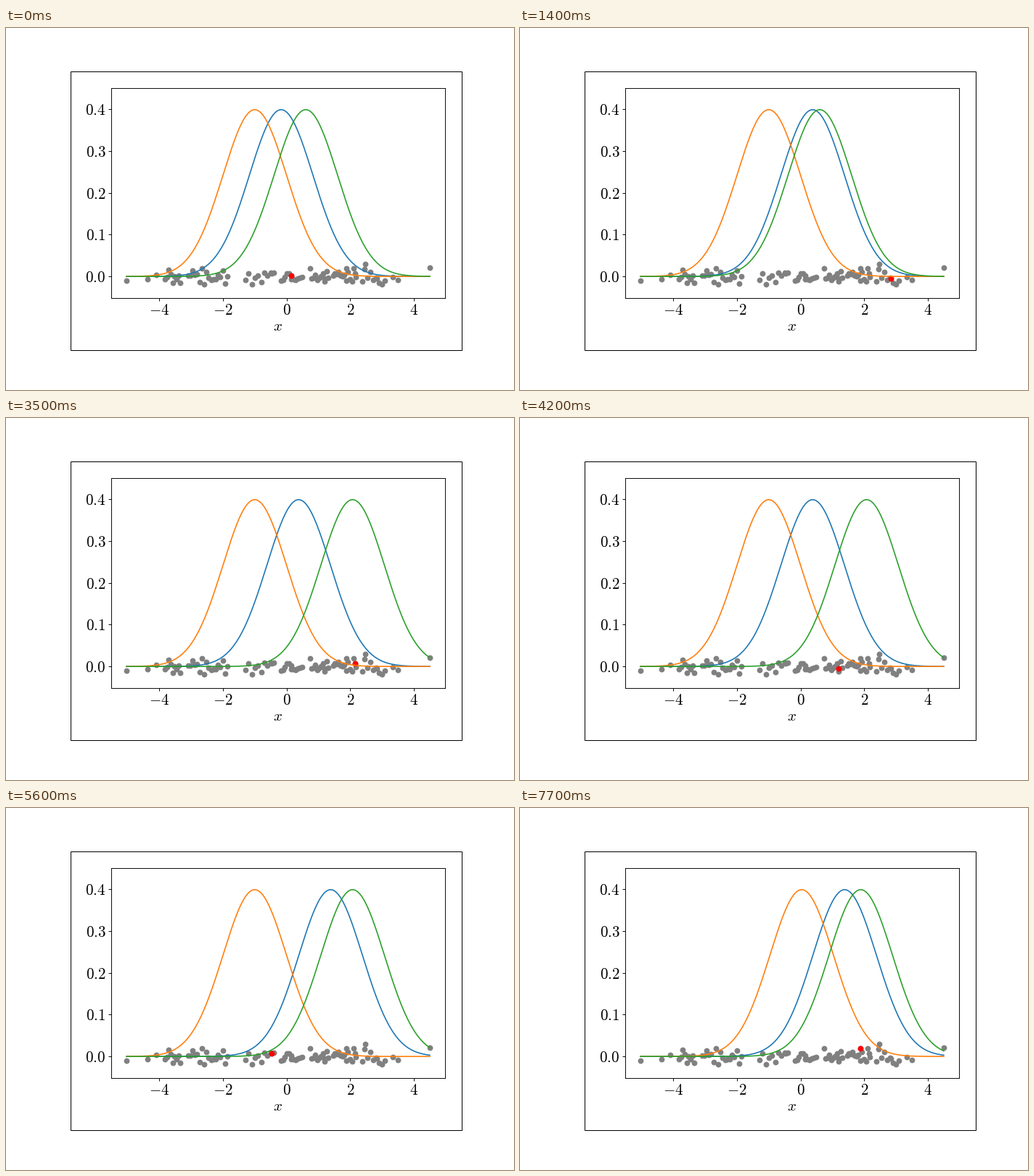
A matplotlib script for the animation above (8 s loop, 700 by 500 pixels).

```python
import numpy as np
import matplotlib.pyplot as plt
from matplotlib.animation import FuncAnimation
from matplotlib.patches import Rectangle

W, H, DPI = 700, 500, 100
FRAMES, INTERVAL = 80, 100
STEP = 700                      # ms between two updates
PT = 0.842                      # scale of all point sizes

X0, Y0 = 386.6, 343.2           # stage position of the data origin
SX, SY = 43.85, 577.5           # pixels per data unit
LEFT, TOP, RIGHT, BOTTOM = 145, 83, 605, 373

# Means over time: (step at which the value starts, value)
MEANS = {
    "tab:blue": [(0, -0.17), (1, 0.38), (7, 1.385)],
    "tab:orange": [(0, -1.0), (9, 0.035)],
    "tab:green": [(0, 0.604), (3, 1.99), (5, 2.075), (11, 1.89)],
}
# Sample highlighted in turn, every second step
PICKS = [(0.145, 0.002), (2.835, -0.005), (2.146, 0.007),
         (1.195, -0.004), (-0.47, 0.007), (1.888, 0.020)]
OUTLIERS = [(-5.03, -0.01), (-4.36, -0.006), (-4.1, 0.003), (2.48, 0.03),
            (3.33, -0.002), (3.5, -0.009), (4.5, 0.021)]
# Runs of samples: first x, last x, count
RUNS = [(-3.82, -3.34, 9), (-3.1, -1.86, 18), (-1.29, -0.4, 10),
        (-0.18, 0.48, 11), (0.73, 1.32, 11), (1.46, 2.17, 13), (2.37, 3.08, 9)]


def make_samples():
    rng = np.random.default_rng(4)
    x = np.concatenate([np.linspace(*run) for run in RUNS])
    y = np.clip(rng.normal(0, 0.0095, x.size), -0.018, 0.02)
    return np.vstack([np.column_stack([x, y]), OUTLIERS, PICKS])


def at(track, step):
    return [value for start, value in track if start <= step][-1]


def normal(x, mean):
    return np.exp(-(x - mean) ** 2 / 2) / np.sqrt(2 * np.pi)


plt.rcParams.update({"mathtext.fontset": "cm", "font.size": 18 * PT})
fig = plt.figure(figsize=(W / DPI, H / DPI), dpi=DPI, facecolor="white")
fig.add_artist(Rectangle((89, H - 445), 539, 385, transform=None,
                         fill=False, ec="black", lw=0.72))

ax = fig.add_axes([LEFT / W, 1 - BOTTOM / H, (RIGHT - LEFT) / W, (BOTTOM - TOP) / H])
ax.set_xlim((LEFT - X0) / SX, (RIGHT - X0) / SX)
ax.set_ylim((Y0 - BOTTOM) / SY, (Y0 - TOP) / SY)
xticks = range(-4, 5, 2)
yticks = np.arange(5) / 10
ax.set_xticks(xticks, [f"${v}$" for v in xticks])
ax.set_yticks(yticks, [f"${v:.1f}$" for v in yticks])
ax.tick_params(length=3.5 * PT, width=0.8 * PT, pad=2.9 * PT)
for spine in ax.spines.values():
    spine.set_linewidth(0.8 * PT)
fig.text(374.7 / W, 1 - 417.5 / H, "$x$", ha="center", va="baseline")

samples = make_samples()
dot = dict(s=(6.7 * PT) ** 2, linewidths=0)
ax.scatter(*samples.T, color="grey", zorder=1, **dot)
pick = ax.scatter([0], [0], color="red", zorder=1.5, **dot)

grid = np.linspace(samples[:, 0].min(), samples[:, 0].max(), 400)
curves = [ax.plot(grid, normal(grid, 0), color=color, lw=1.4 * PT)[0]
          for color in MEANS]


def draw(frame):
    step = frame * INTERVAL // STEP
    for curve, track in zip(curves, MEANS.values()):
        curve.set_ydata(normal(grid, at(track, step)))
    pick.set_offsets([PICKS[step // 2]])
    return [*curves, pick]


anim = FuncAnimation(fig, draw, frames=FRAMES, interval=INTERVAL,
                     repeat=True, repeat_delay=0)
plt.show()
```
